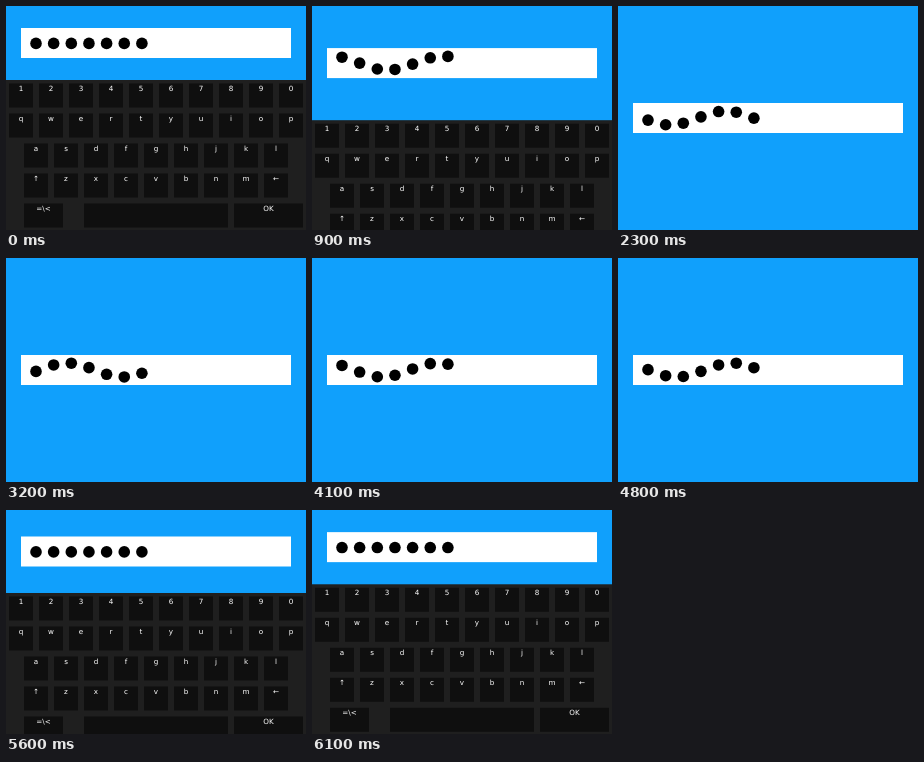
Recreate the animation shown at these times as an HTML page. Size 300 px wide and 224 px high, loop 7900 ms.

```html
<!DOCTYPE html>
<html lang="en">
<head>
<meta charset="utf-8">
<title>Password keyboard</title>
<style>
  html, body { margin: 0; width: 100%; height: 100%; overflow: hidden; background: #10a0fc; }
  svg { display: block; width: 100vw; height: 100vh; }
  text { font: 7.2px "DejaVu Sans", sans-serif; fill: #fff; text-anchor: middle; }
</style>
</head>
<body>
<svg viewBox="0 0 300 224">
  <rect width="300" height="224" fill="#10a0fc"/>
  <g id="field"><rect x="15" y="-15" width="270" height="30" fill="#fff"/></g>
  <g id="keyboard"><rect width="300" height="152" fill="#1f1f1f"/></g>
</svg>
<script>
const LOOP = 7900, STEP = 100;
const HIDE = 855, SHOW = 5194, SLIDE = 1000;
const HEIGHT = 224, BOARD = 150, UNIT = 30, GAP = 3;
const WAVE = { height: 7, speed: 9.91, origin: 1.001 };

const field = document.getElementById('field');
const keyboard = document.getElementById('keyboard');

function add(parent, tag, attrs, label = '') {
  const node = document.createElementNS('http://www.w3.org/2000/svg', tag);
  for (const name in attrs) node.setAttribute(name, attrs[name]);
  node.textContent = label;
  parent.append(node);
  return node;
}

function addKey(label, x, row, width = UNIT) {
  const y = row * UNIT;
  add(keyboard, 'rect', {
    x: x + GAP, y: y + GAP + 0.5, width: width - 2 * GAP, height: UNIT - 2 * GAP, fill: '#0f0f0f'
  });
  if (label) add(keyboard, 'text', { x: x + width / 2, y: y + 10.7 }, label);
}

['1234567890', 'qwertyuiop', 'asdfghjkl', '↑zxcvbnm←'].forEach((keys, row) => {
  const left = (300 - keys.length * UNIT) / 2;
  [...keys].forEach((key, i) => addKey(key, left + i * UNIT, row));
});
addKey('=\\<', 15, 4, 45);
addKey('', 75, 4, 150);
addKey('OK', 225, 4, 75);

const dots = Array.from({ length: 7 }, (_, i) =>
  add(field, 'circle', { cx: 30 + i * 17.65, cy: 0, r: 5.8 }));

function expoOut(u) {
  if (u <= 0) return 0;
  return u >= 1 ? 1 : 1 - 2 ** (-10 * u);
}

function draw(ms) {
  const hidden = expoOut((ms - HIDE) / SLIDE) - expoOut((ms - SHOW) / SLIDE);
  const top = HEIGHT - BOARD * (1 - hidden);
  keyboard.setAttribute('transform', `translate(0 ${top})`);
  // The field stays centred in the space above the keyboard.
  field.setAttribute('transform', `translate(0 ${top / 2})`);

  const waving = ms > HIDE && ms < SHOW;
  const phase = WAVE.speed * (ms / 1000 - WAVE.origin);
  dots.forEach((dot, i) =>
    dot.setAttribute('cy', waving ? WAVE.height * Math.sin(phase + i) : 0.4));
}

const start = performance.now();
function tick() {
  const ms = (performance.now() - start) % LOOP;
  draw(Math.floor(ms / STEP) * STEP);
  requestAnimationFrame(tick);
}
tick();
</script>
</body>
</html>
```
